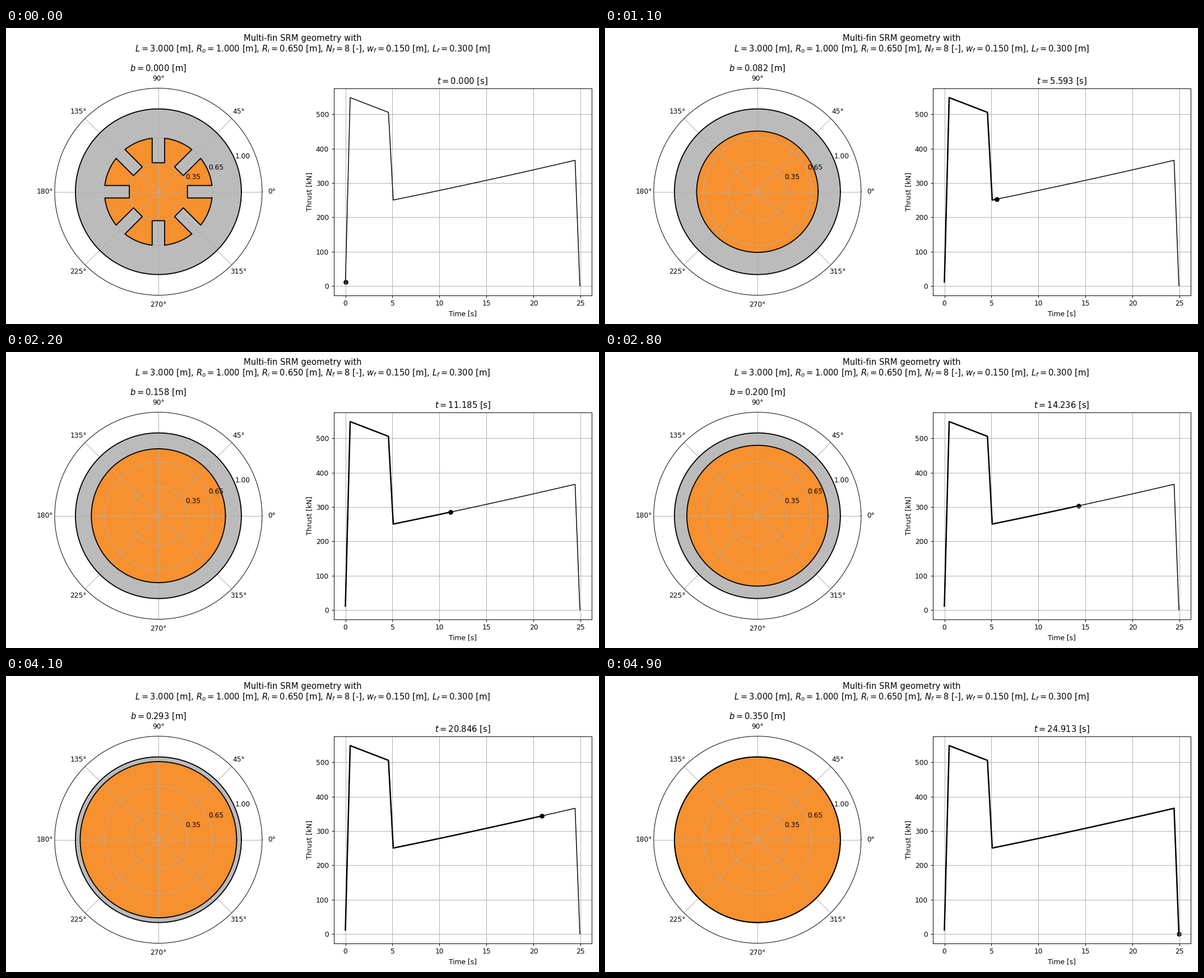
Animation, 1058 px wide and 529 px high, one loop 5 s. Source, as a matplotlib script:

```python
import numpy as np
import matplotlib.pyplot as plt
from matplotlib.animation import FuncAnimation

W, H = 1058, 529
FRAMES, INTERVAL = 50, 100
T_END = 24.913
R_OUT, R_IN, N_FIN, W_FIN, L_FIN = 1.0, 0.65, 8, 0.15, 0.3
FIN_END = 10  # first step at which the fins are gone

plt.rcParams["font.family"] = "DejaVu Sans"


def burnt_depth(i):
    """Distance burnt into the grain at step i."""
    if i < FIN_END:
        return 0.0078 * i - 1e-5 * i**2
    radius = (0.95526 + 0.0057 * (i - 41)) ** (1 / 0.78)
    return min(radius, R_OUT) - R_IN


def thrust_at(i):
    """Thrust in kN at step i."""
    if i == 0:
        return 11.0
    if i == FRAMES - 1:
        return 0.0
    if i < FIN_END:
        return 549 - 43 * (i - 1) / 8
    return 369 * (R_IN + burnt_depth(i)) ** 1.21


def bore_outline(b):
    """Closed polar outline of the burnt region."""
    radius = R_IN + b
    half = W_FIN / 2 - b
    if half <= 0:
        theta = np.linspace(0, 2 * np.pi, 361)
        return theta, np.full_like(theta, radius)

    base = np.sqrt(radius**2 - half**2)
    tip = radius - (L_FIN - b)
    x = np.array([base, tip, tip, base])
    y = np.array([-half, -half, half, half])
    fin_theta, fin_r = np.arctan2(y, x), np.hypot(x, y)
    step = 2 * np.pi / N_FIN
    arc = np.linspace(fin_theta[-1], step + fin_theta[0], 42)[1:-1]
    piece = np.concatenate([fin_theta, arc])
    theta = np.concatenate([piece + k * step for k in range(N_FIN)])
    r = np.tile(np.concatenate([fin_r, np.full_like(arc, radius)]), N_FIN)
    return np.append(theta, theta[0] + 2 * np.pi), np.append(r, r[0])


def place(left, top, width, height):
    """Axes rectangle from pixels measured from the top left."""
    return [left / W, 1 - (top + height) / H, width / W, height / H]


time = np.linspace(0, T_END, FRAMES)
depth = [burnt_depth(i) for i in range(FRAMES)]
thrust = np.array([thrust_at(i) for i in range(FRAMES)])

fig = plt.figure(figsize=(12, 6), dpi=W / 12)
fig.suptitle(
    "Multi-fin SRM geometry with\n"
    + " " * 8
    + f"$L = 3.000$ [m], $R_o = {R_OUT:.3f}$ [m], $R_i = {R_IN:.3f}$ [m], "
    + f"$N_f = {N_FIN}$ [-], $w_f = {W_FIN:.3f}$ [m], $L_f = {L_FIN:.3f}$ [m]"
)

# Grain cross-section
grain = fig.add_axes(place(86.9, 107.6, 370, 370), projection="polar")
circle = np.linspace(0, 2 * np.pi, 361)
rim = np.full_like(circle, R_OUT)
grain.fill(circle, rim, color="#bbbbbb", lw=0)
bore, = grain.fill(*bore_outline(0), color="#f7902e", lw=0)
grain.plot(circle, rim, "k", lw=1.5)
edge, = grain.plot([], [], "k", lw=1.5)
grain.set_ylim(0, 1.25)
grain.set_yticks([0.35, 0.65, 1.0], ["0.35", "0.65", "1.00"])

# Thrust curve
curve = fig.add_axes(place(584.6, 107.6, 460.2, 370))
curve.plot(time, thrust, "k", lw=1.2)
trace, = curve.plot([], [], "k", lw=2)
dot = curve.scatter([0], [thrust[0]], c="k")
curve.set_xlim(-0.05 * T_END, 1.05 * T_END)
curve.set_ylim(-0.05 * thrust.max(), 1.05 * thrust.max())
curve.set_xlabel("Time [s]")
curve.set_ylabel("Thrust [kN]")
curve.grid()


def update(i):
    theta, r = bore_outline(depth[i])
    bore.set_xy(np.column_stack([theta, r]))
    edge.set_data(theta, r)
    trace.set_data(time[: i + 1], thrust[: i + 1])
    dot.set_offsets([[time[i], thrust[i]]])
    grain.set_title(f"$b = {depth[i]:.3f}$ [m]")
    curve.set_title(f"$t = {time[i]:.3f}$ [s]")
    return bore, edge, trace, dot


anim = FuncAnimation(
    fig, update, frames=FRAMES, interval=INTERVAL, repeat=True, repeat_delay=0
)
plt.show()
```
